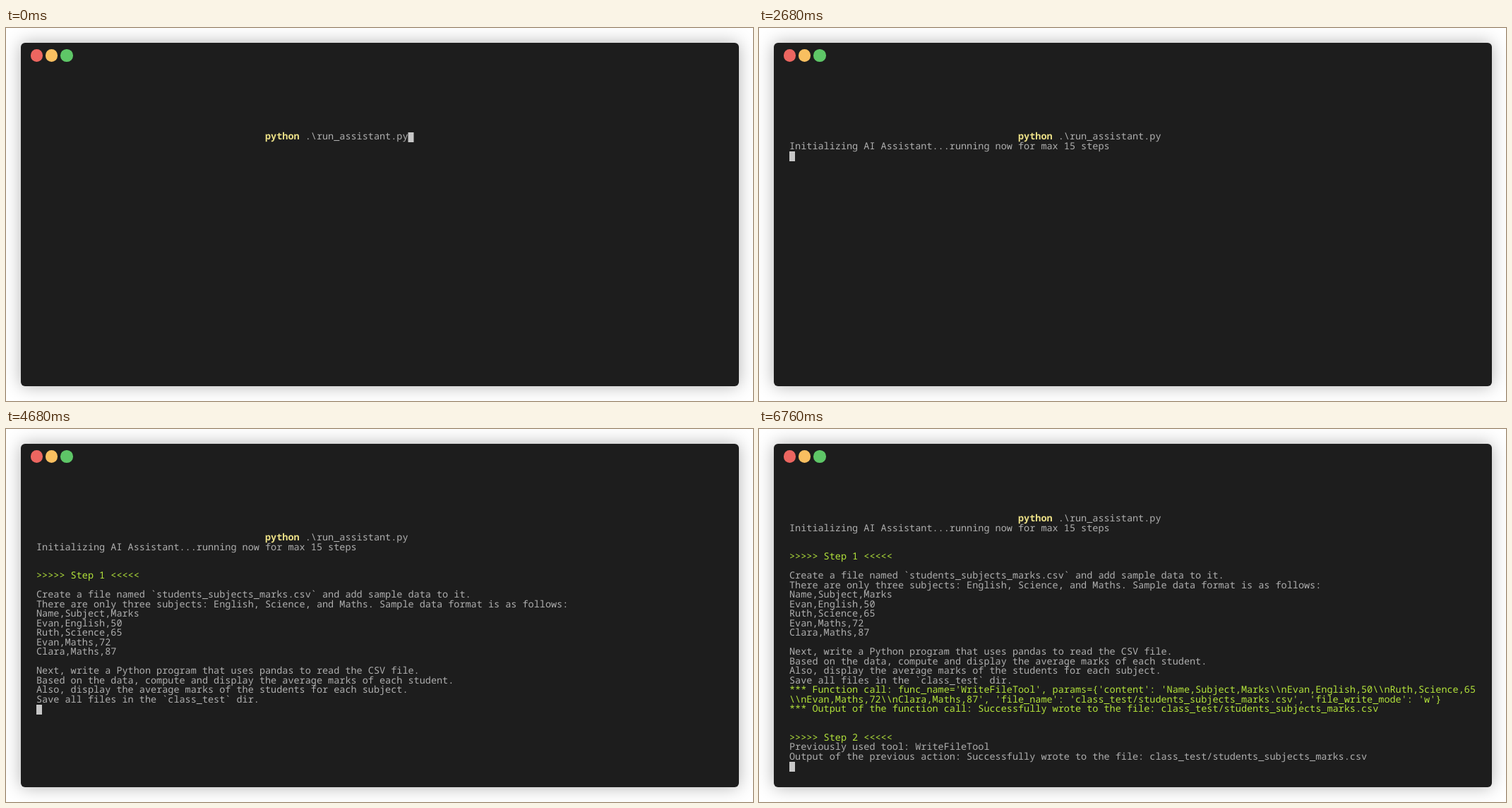
These frames come from a looping animation (1058 px wide and 529 px high, 8 s). An HTML page:

```html
<!DOCTYPE html>
<html lang="en">
<head>
<meta charset="utf-8">
<title>Terminal session</title>
<style>
  html, body { margin: 0; width: 100%; height: 100%; overflow: hidden; background: #fff; }
  .window {
    position: absolute; left: 20.7px; top: 20.7px; width: 1017.3px; height: 487.5px;
    background: #1d1d1d; border-radius: 6px; box-shadow: 0 0 24px rgba(0, 0, 0, .3);
  }
  .button { position: absolute; top: 30.3px; width: 17.4px; height: 17.4px; border-radius: 50%; }
  #screen, #cursor {
    position: absolute; left: 43px; margin: 0; white-space: pre; color: #afafaf;
    font: 13.5px/13.5px "Noto Sans Mono", "DejaVu Sans Mono", monospace;
    text-rendering: geometricPrecision; font-variant-ligatures: none;
  }
  #screen { top: 147px; }
  #cursor { top: 148.2px; width: 8.1px; height: 13.5px; line-height: 11.1px; background: #c7c7c7; color: #1d1d1d; }
  b { color: #ebdf86; }
  i { color: #b3e33b; font-style: normal; }
</style>
</head>
<body>
<div class="window"></div>
<div class="button" style="left:34.8px;background:#ec6660"></div>
<div class="button" style="left:56.1px;background:#f9bf60"></div>
<div class="button" style="left:77.4px;background:#5ec667"></div>
<div id="cursor"></div>
<div id="screen"><div>                                        <b>python</b> .\run_assistant.py</div><div>Initializing AI Assistant...running now for max 15 steps</div><div>

<i>&gt;&gt;&gt;&gt;&gt; Step 1 &lt;&lt;&lt;&lt;&lt;</i>

Create a file named `students_subjects_marks.csv` and add sample data to it.
There are only three subjects: English, Science, and Maths. Sample data format is as follows:
Name,Subject,Marks
Evan,English,50
Ruth,Science,65
Evan,Maths,72
Clara,Maths,87

Next, write a Python program that uses pandas to read the CSV file.
Based on the data, compute and display the average marks of each student.
Also, display the average marks of the students for each subject.
Save all files in the `class_test` dir.</div><div><i>*** Function call: func_name='WriteFileTool', params={'content': 'Name,Subject,Marks\\nEvan,English,50\\nRuth,Science,65
\\nEvan,Maths,72\\nClara,Maths,87', 'file_name': 'class_test/students_subjects_marks.csv', 'file_write_mode': 'w'}
*** Output of the function call: Successfully wrote to the file: class_test/students_subjects_marks.csv</i>


<i>&gt;&gt;&gt;&gt;&gt; Step 2 &lt;&lt;&lt;&lt;&lt;</i>
Previously used tool: WriteFileTool
Output of the previous action: Successfully wrote to the file: class_test/students_subjects_marks.csv</div></div>
<script>
  const LOOP = 8000, CELL = 8.1, ROW = 13.5;
  const screenBox = document.getElementById('screen');
  const cursor = document.getElementById('cursor');
  const blocks = [...screenBox.children];

  // Cursor rows and columns are counted from the command line, before scrolling.
  const states = [
    { at: 0,    blocks: 1, row: 0,  col: 65, scroll: 0, under: '' },
    { at: 850,  blocks: 1, row: 1,  col: 0,  scroll: 0, under: '' },
    { at: 2680, blocks: 2, row: 2,  col: 0,  scroll: 0, under: '' },
    { at: 4680, blocks: 3, row: 18, col: 0,  scroll: 0, under: '' },
    { at: 6660, blocks: 4, row: 25, col: 0,  scroll: 1, under: 'O' },
    { at: 6760, blocks: 4, row: 26, col: 0,  scroll: 2, under: '' }
  ];
  let shown;

  function show(state) {
    blocks.forEach((block, i) => block.hidden = i >= state.blocks);
    screenBox.style.transform = `translateY(${-state.scroll * ROW}px)`;
    cursor.style.transform = `translate(${state.col * CELL}px, ${(state.row - state.scroll) * ROW}px)`;
    cursor.textContent = state.under;
    // The block cursor covers the text only when it sits on a character.
    cursor.style.zIndex = state.under ? 1 : 0;
  }

  const start = performance.now();
  function tick() {
    const time = (performance.now() - start) % LOOP;
    const state = states.findLast(s => s.at <= time);
    if (state !== shown) show(shown = state);
    requestAnimationFrame(tick);
  }
  tick();
</script>
</body>
</html>
```
